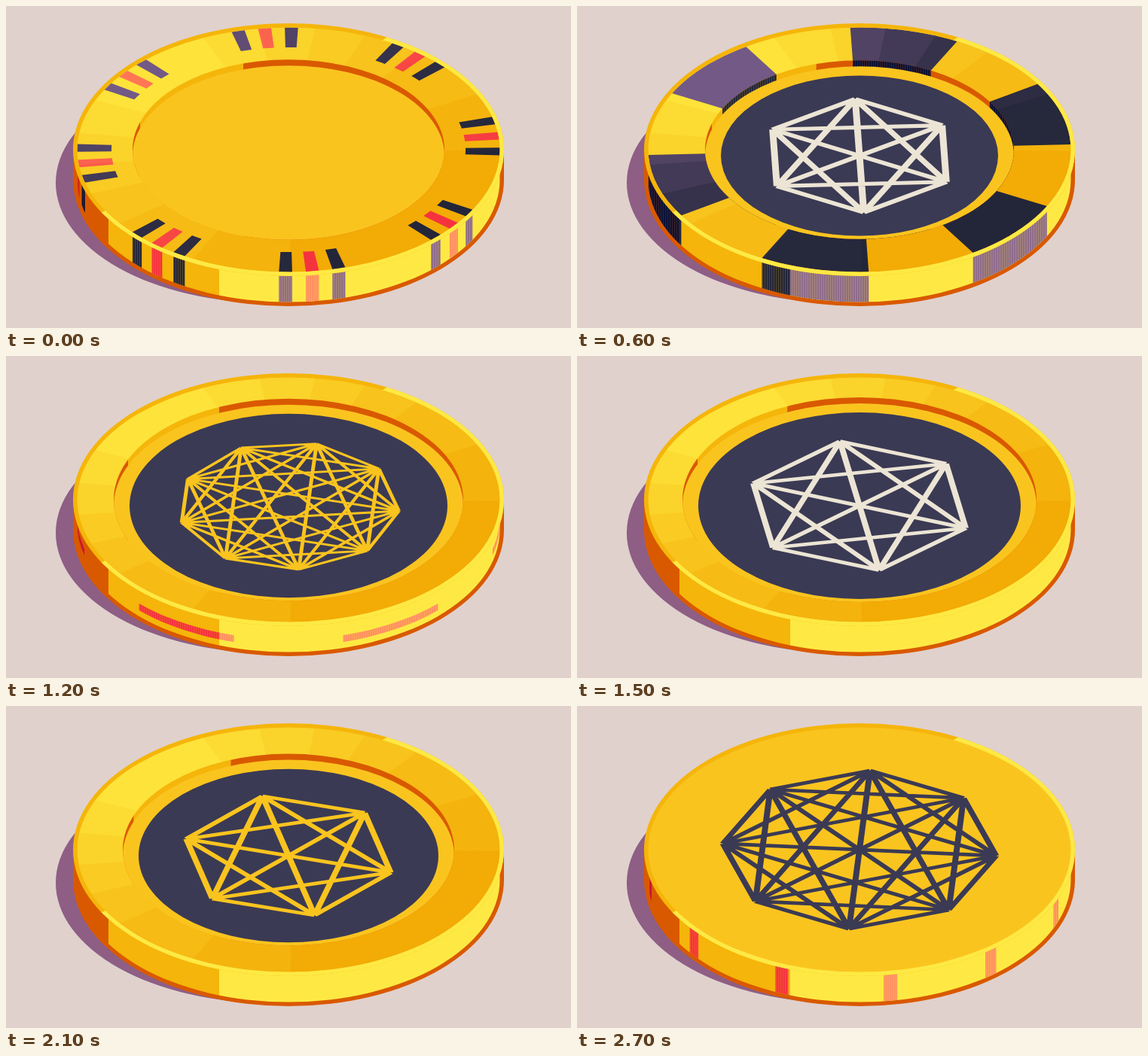
An HTML page with a canvas that plays this animation: 750x428 px, repeating every 3000 ms.

```html
<!DOCTYPE html>
<html lang="en">
<head>
<meta charset="utf-8">
<title>Poker chips</title>
<style>
html, body { margin: 0; height: 100%; overflow: hidden; background: #e0d1cd; }
canvas { display: block; width: 100vw; height: 100vh; }
</style>
</head>
<body>
<canvas width="750" height="428"></canvas>
<script>
const canvas = document.querySelector('canvas');
const c = canvas.getContext('2d');
const CX = 375, CY = 191, SQUASH = 0.579, FACE = 280.5, WALL = 40;
const GOLD = '#fac41f', NAVY = '#3b3a54', IVORY = '#ece5d5', ORANGE = '#d95900';
const STEP_MS = 300;

// wall: colours in deep shade, half shade and light; face: shaded and lit ends
const inks = {
  gold: { wall: [ORANGE, '#f5b50a', '#fee944'], face: [[243, 171, 5], [253, 227, 58]], power: 1 },
  dark: { wall: ['#0b1236', '#23263a', '#8f6c8a'], face: [[35, 38, 57], [115, 89, 134]], power: 1.7 },
  red: { wall: ['#cc1030', '#f5333f', '#ff9160'], face: [[245, 51, 63], [255, 118, 85]], power: 1 }
};
// Shade levels by angular distance from the darkest direction (45 degrees)
const levels = [0, 44.5, 72, 98, 114, 128, 143, 159, 180];

const mark = (ink, start, width, period, inner = 0) => ({ ink, start, width, period, inner });
const star = (n, radius, turn, line, color) => ({ n, radius, turn, line, color });

const chips = [
  { hole: 207, depth: 8, marks: [
    mark('dark', -15.6, 3.6, 45, 235), mark('red', -8.3, 3.6, 45, 235), mark('dark', -1, 3.6, 45, 235)] },
  { hole: 224, depth: 8, disc: true, star: star(9, 143, 180, 5, GOLD),
    marks: [mark('dark', 4.5, 11.25, 45), mark('red', 15.75, 11.25, 45)] },
  { hole: 205, depth: 8, disc: true, star: star(6, 130, 27.5, 9, IVORY),
    marks: [mark('dark', -2.5 + 30, 30, 60)] },
  { hole: 216, depth: 8, disc: true, star: star(8, 138, 12, 6, GOLD),
    marks: [mark('red', 7, 22.5, 45)] },
  { hole: 232, depth: 8, disc: true, star: star(9, 147, 4.7, 5, GOLD),
    marks: [mark('red', 45, 30, 60)], sideOnly: true, strip: [214, 223] },
  { hole: 235, depth: 8, disc: true, star: star(6, 150, 20, 8, IVORY), marks: [] },
  { hole: 190, depth: 0, disc: true, star: star(9, 118, 4.2, 4.5, IVORY),
    marks: [mark('red', 15.1, 3.75, 30)] },
  { hole: 220, depth: 8, disc: true, star: star(6, 141, 15.8, 8, GOLD), marks: [] },
  { hole: 0, depth: 0, star: star(7, 158, 10, 8, NAVY),
    marks: [mark('dark', -7, 7.5, 45)], sideOnly: true },
  { hole: 0, depth: 0, star: star(8, 182, 4.4, 8, NAVY),
    marks: [mark('red', 19.7, 3.75, 30)], sideOnly: true }
];

const rad = deg => deg * Math.PI / 180;
const at = (deg, r) => [CX + r * Math.cos(rad(deg)), CY + r * SQUASH * Math.sin(rad(deg))];

function oval(r, y = CY, ry = r * SQUASH, x = CX) {
  c.moveTo(x + r, y);
  c.ellipse(x, y, r, ry, 0, 0, 7);
}

function fillOval(color, ...shape) {
  c.beginPath();
  oval(...shape);
  c.fillStyle = color;
  c.fill();
}

function clipped(outline, paint, rule = 'nonzero') {
  c.save();
  c.beginPath();
  outline();
  c.clip(rule);
  paint();
  c.restore();
}

function sector(from, to, outer, inner) {
  c.moveTo(...at(from, inner));
  c.lineTo(...at(from, outer));
  c.ellipse(CX, CY, outer, outer * SQUASH, 0, rad(from), rad(to));
  c.lineTo(...at(to, inner));
  c.ellipse(CX, CY, inner, inner * SQUASH, 0, rad(to), rad(from), true);
  c.closePath();
}

function eachMark(m, draw) {
  for (let a = m.start; a < m.start + 359; a += m.period) draw(a, a + m.width);
}

function paintFace(name) {
  const { face: [low, high], power } = inks[name];
  for (let i = 0; i < 8; i++) {
    const t = (i / 7) ** power;
    c.fillStyle = `rgb(${low.map((v, k) => Math.round(v + (high[k] - v) * t))})`;
    for (const side of [-1, 1]) {
      const ends = [45 + side * levels[i], 45 + side * levels[i + 1]].sort((p, q) => p - q);
      c.beginPath();
      sector(ends[0] - 0.15, ends[1] + 0.15, FACE, 0);
      c.fill();
    }
  }
}

function paintZones(name, zones) {
  for (const [from, to, tone] of zones) {
    c.fillStyle = inks[name].wall[tone];
    c.fillRect(from, 0, to - from, 428);
  }
}

// Upright marks on a wall, with fine ribs of the wall showing through
function paintWall(chip, r, zones) {
  paintZones('gold', zones);
  for (const m of chip.marks) {
    const stripes = () => eachMark(m, (a, b) => {
      const x = at(a, r)[0], x2 = at(b, r)[0];
      const mid = Math.sin(rad((a + b) / 2));
      const front = r === FACE ? 1 : -1;
      const reach = Math.max(Math.sin(rad(a)) * front, Math.sin(rad(b)) * front);
      if (mid * front < -0.001 && reach < 0.05) return;
      // A mark that wraps round the edge reaches the outermost point
      const wraps = Math.sin(rad(a)) * Math.sin(rad(b)) < 0;
      const edge = CX + Math.sign(x - CX) * r;
      const seen = Math.sin(rad(a)) * front > 0 ? x : x2;
      const left = wraps ? Math.min(seen, edge) : Math.min(x, x2);
      const right = wraps ? Math.max(seen, edge) : Math.max(x, x2);
      c.rect(left, 0, right - left, 428);
    });
    clipped(stripes, () => {
      paintZones(m.ink, zones);
      c.globalAlpha = 0.22;
      for (const [from, to, tone] of zones) {
        c.fillStyle = inks.gold.wall[tone];
        for (let x = Math.ceil(from / 3) * 3; x < to; x += 3) c.fillRect(x, 0, 1, 428);
      }
      c.globalAlpha = 1;
    });
  }
}

function drawSide(chip) {
  c.fillStyle = ORANGE;
  c.fillRect(CX - 286, CY, 572, WALL);
  fillOval(ORANGE, 286, CY + WALL, 168);
  const zones = [[0, 136, 0], [136, 283, 1], [283, 750, 2]];
  const wall = (top, bottom) => {
    c.moveTo(CX + FACE, top);
    c.lineTo(CX + FACE, bottom);
    c.ellipse(CX, bottom, FACE, 162.5, 0, 0, Math.PI);
    c.lineTo(CX - FACE, top);
    c.ellipse(CX, top, FACE, 162.5, 0, Math.PI, 0, true);
    c.closePath();
  };
  clipped(() => wall(CY, CY + WALL), () => {
    if (!chip.strip) return paintWall(chip, FACE, zones);
    paintZones('gold', zones);
    clipped(() => wall(...chip.strip), () => paintWall(chip, FACE, zones));
  });
}

function drawRim() {
  fillOval('#f5b50a', 286, CY, 168);
  clipped(() => {
    c.moveTo(128, 274);
    c.lineTo(505, 42);
    c.lineTo(750, -60);
    c.lineTo(750, 428);
    c.lineTo(60, 428);
    c.lineTo(60, 250);
  }, () => fillOval('#fee944', 286, CY, 168));
}

function drawFace(chip) {
  fillOval(GOLD, FACE, CY, 162.5);
  if (!chip.hole) return;
  clipped(() => oval(FACE, CY, 162.5), () => {
    paintFace('gold');
    if (chip.sideOnly) return;
    for (const m of chip.marks) {
      clipped(() => eachMark(m, (a, b) => sector(a, b, FACE + 2, m.inner || chip.hole - 1)),
        () => paintFace(m.ink));
    }
  });
}

function drawHole(chip) {
  const { hole, depth } = chip;
  if (!hole) return;
  clipped(() => oval(hole), () => {
    const left = CX - 197 - (hole - 207) * 0.64;
    const right = CX - 60 - (hole - 207) * 1.28;
    const plain = chip.sideOnly || chip.marks.some(m => m.inner);
    if (depth) {
      paintWall(plain ? { marks: [] } : chip, hole,
        [[0, left, 0], [left, right, 1], [right, 750, 0]]);
    }
    fillOval(GOLD, hole, CY + depth);
    if (chip.disc) fillOval(NAVY, hole - 21, CY + depth);
  });
}

function drawStar({ n, radius, turn, line, color }, y) {
  c.save();
  c.translate(CX, y);
  c.scale(1, SQUASH);
  c.strokeStyle = color;
  c.lineWidth = line;
  c.beginPath();
  const corner = i => {
    const a = rad(turn + i * 360 / n);
    return [radius * Math.cos(a), radius * Math.sin(a)];
  };
  for (let i = 0; i < n; i++) {
    for (let j = 0; j < i; j++) {
      c.moveTo(...corner(i));
      c.lineTo(...corner(j));
    }
  }
  c.stroke();
  c.restore();
}

function draw(chip) {
  c.fillStyle = '#e0d1cd';
  c.fillRect(0, 0, 750, 428);
  fillOval('#8e5e85', 286, 235, 160, 352);
  drawSide(chip);
  drawRim();
  drawFace(chip);
  drawHole(chip);
  if (chip.star) drawStar(chip.star, CY + chip.depth);
}

const start = performance.now();
let shown = -1;
function tick() {
  const index = Math.floor(Math.max(0, performance.now() - start) / STEP_MS) % chips.length;
  if (index !== shown) draw(chips[shown = index]);
  requestAnimationFrame(tick);
}
tick();
</script>
</body>
</html>
```
